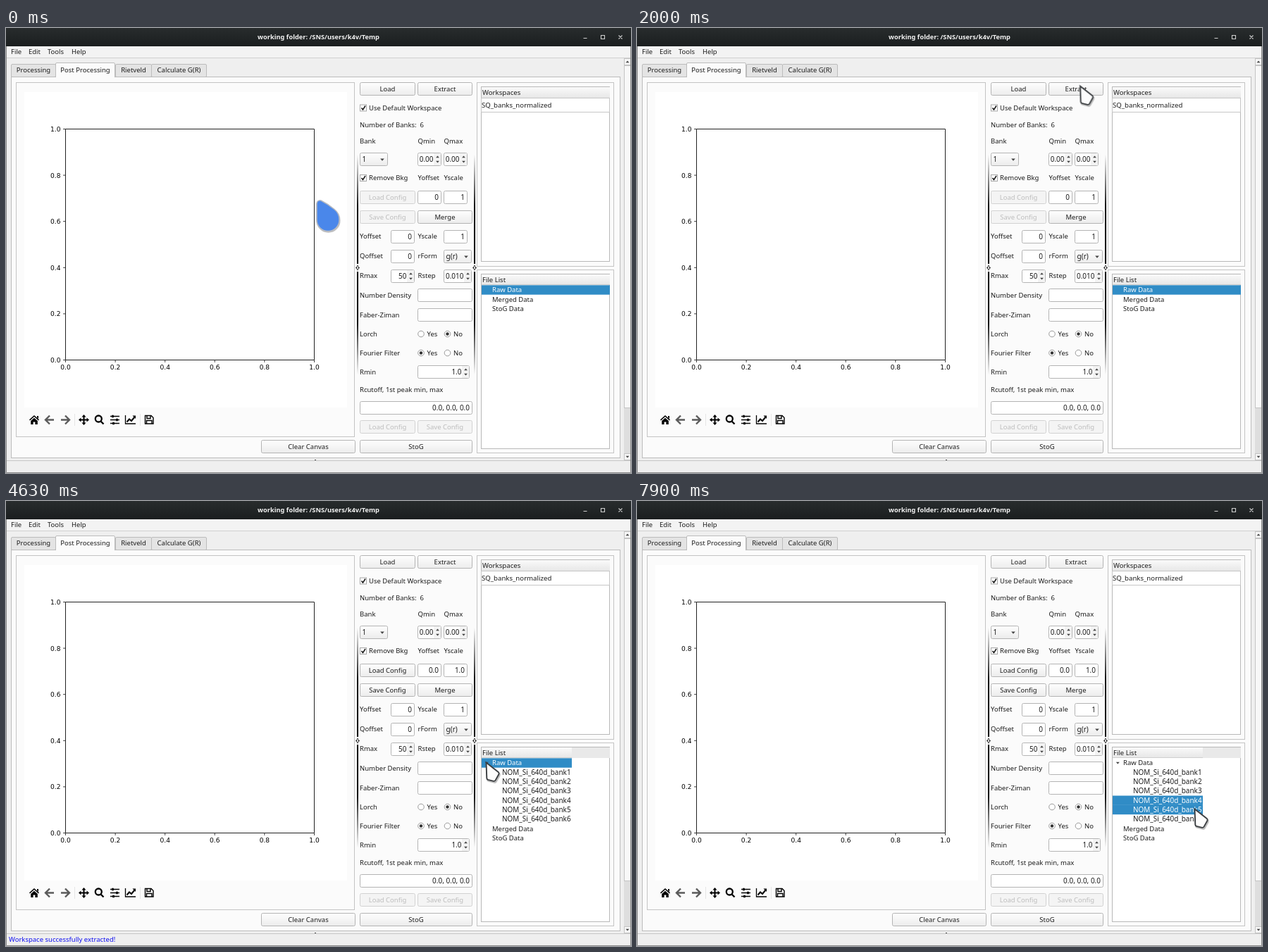
Animation of 887x632 px, one loop 8000 ms. Source, as an HTML page:

```html
<!DOCTYPE html>
<html lang="en">
<head>
<meta charset="utf-8">
<title>Post Processing</title>
<style>
html, body { margin: 0; width: 100%; height: 100%; overflow: hidden; background: #efefef; }
svg { display: block; width: 887px; height: 632px; }
text { font: 9.5px "Noto Sans", sans-serif; fill: #1c1c1c; white-space: pre; }
.tick { font: 9.1px "DejaVu Sans", sans-serif; fill: #000; }
.title { font-weight: 700; font-size: 9.25px; fill: #f2f2f2; }
.num { font-size: 10px; }
.bank { font-size: 9.95px; }
.item { font-size: 9.65px; }
.off { fill: #bdbdbd; }
.sel { fill: #fff; }
.status { fill: #1010f0; }
</style>
</head>
<body>
<svg id="stage" viewBox="0 0 887 632">
  <defs>
    <linearGradient id="face" x2="0" y2="1"><stop stop-color="#fefefe"/><stop offset="1" stop-color="#ececec"/></linearGradient>
    <linearGradient id="head" x2="0" y2="1"><stop stop-color="#fafafa"/><stop offset="1" stop-color="#e6e6e6"/></linearGradient>
    <linearGradient id="bar" x2="0" y2="1"><stop stop-color="#282c2d"/><stop offset="1" stop-color="#1b1e1f"/></linearGradient>
    <linearGradient id="grip" x2="0" y2="1">
      <stop stop-color="#000" stop-opacity="0"/><stop offset=".25"/><stop offset=".75"/><stop offset="1" stop-color="#000" stop-opacity="0"/>
    </linearGradient>
  </defs>
</svg>
<script>
const LOOP = 8000;
const rules = new Map();
const pct = ms => +(ms / LOOP * 100).toFixed(4) + '%';

// Content visible only between two times of the loop.
function during(from, to, content) {
  const name = `show-${from}-${to}`;
  rules.set(name, `0%{visibility:hidden}${pct(from)}{visibility:visible}${pct(to)}{visibility:hidden}`);
  return `<g style="animation:${name} ${LOOP}ms step-end infinite">${content}</g>`;
}

function moving(stops, content) {
  rules.set('pointer', stops.map(([ms, x, y]) => `${pct(ms)}{transform:translate(${x}px,${y}px)}`).join(''));
  return `<g style="animation:pointer ${LOOP}ms linear infinite">${content}</g>`;
}

const fillRect = (x, y, w, h, fill) => `<rect x="${x}" y="${y}" width="${w}" height="${h}" fill="${fill}"/>`;
const box = (x, y, w, h, fill = '#fff', stroke = '#b9b9b9', r = 0) =>
  `<rect x="${x + .5}" y="${y + .5}" width="${w - 1}" height="${h - 1}" rx="${r}" fill="${fill}" stroke="${stroke}"/>`;
const path = (d, stroke = '#000', width = 1, fill = 'none') =>
  `<path d="${d}" stroke="${stroke}" stroke-width="${width}" fill="${fill}"/>`;
const solid = (d, fill = '#000') => `<path d="${d}" fill="${fill}"/>`;
// y is the middle of the line of text
const text = (x, y, s, cls = '', anchor = 'start') =>
  `<text x="${x}" y="${y + 3.4}" class="${cls}" text-anchor="${anchor}">${s}</text>`;

const down = (x, y, s = 2.4) => solid(`M${x - s} ${y - s / 2}h${2 * s}l${-s} ${s * 1.1}z`, '#444');
const up = (x, y, s = 2.4) => solid(`M${x - s} ${y + s / 2}h${2 * s}l${-s} ${-s * 1.1}z`, '#444');

const button = (x, y, w, label, on = true) =>
  box(x, y, w, 19, on ? 'url(#face)' : '#f4f4f4', on ? '#b4b4b4' : '#d2d2d2', 2) +
  text(x + w / 2, y + 9.5, label, on ? '' : 'off', 'middle');
const field = (x, y, w, value = '') =>
  box(x, y, w, 19, '#fff', '#b4b4b4', 2) + text(x + w - 4, y + 9.5, value, 'num', 'end');
const spin = (x, y, w, value) =>
  box(x, y, w, 19, '#fff', '#b4b4b4', 2) + fillRect(x + w - 11, y + 1, 10, 17, '#f3f3f3') +
  text(x + w - 11.5, y + 9.5, value, 'num', 'end') + up(x + w - 5.5, y + 6) + down(x + w - 5.5, y + 13);
const combo = (x, y, w, value) =>
  box(x, y, w, 19, 'url(#face)', '#b4b4b4', 2) + text(x + 3.5, y + 9.5, value, 'num') + down(x + w - 8, y + 10, 2.8);
const check = (y, label) =>
  box(502, y - 5, 10, 10, '#fff', '#a8a8a8') + path(`M504.5 ${y}l2 2.5 3.5-5.5`, '#111', 1.5) + text(515, y, label);
const radio = (x, y, label, on) =>
  `<circle cx="${x}" cy="${y}" r="4.3" fill="#fff" stroke="#999"/>` +
  (on ? `<circle cx="${x}" cy="${y}" r="2.2" fill="#333"/>` : '') + text(x + 8.5, y, label);

function frame() {
  const tab = (x, w, label, active) =>
    box(x, active ? 49 : 51, w, active ? 22 : 19, active ? '#fbfbfb' : '#e4e4e4', '#bcbcbc', 1.5) +
    (active ? fillRect(x + 1, 69, w - 2, 3, '#fbfbfb') : '') + text(x + w / 2, active ? 59.5 : 60, label, '', 'middle');
  return fillRect(0, 0, 887, 632, '#efefef') + fillRect(0, 0, 887, 26, 'url(#bar)') +
    text(443.5, 13, 'working folder: /SNS/users/k4v/Temp', 'title', 'middle') +
    path('M819.5 14.5h5M844.5 10.5h5v5h-5zM869.5 10.5l5 5m0-5l-5 5', '#cfcfcf', 1.1) +
    fillRect(0, 26, 887, 16, '#f3f3f3') + path('M0 42.5H887', '#d0d0d0') +
    [[7, 'File'], [32, 'Edit'], [59, 'Tools'], [93, 'Help']].map(([x, s]) => text(x, 33.5, s)).join('') +
    tab(7, 64, 'Processing') + tab(155, 52, 'Rietveld') + tab(206, 79, 'Calculate G(R)') +
    box(7, 69, 865, 542, '#fbfbfb', '#bcbcbc') + tab(70, 85, 'Post Processing', true) +
    fillRect(877, 43, 10, 571, '#dedede') + box(877, 43, 10, 10, '#f6f6f6', '#c4c4c4') + up(882, 48) +
    box(877, 53, 10, 487, '#f8f8f8', '#c4c4c4') + box(877, 604, 10, 10, '#f6f6f6', '#c4c4c4') + down(882, 609) +
    path('M0 614.5H887', '#c6c6c6') + fillRect(438, 613, 2, 1, '#444') +
    path('M.5 26V631.5H886.5V26', '#8a8a8a');
}

function plot() {
  let s = box(14, 77, 481, 504, '#fbfbfb', '#c4c4c4') + fillRect(26, 91, 458, 448, '#fff') +
    path('M84.5 143.5H437.5V471.5H84.5Z', '#222', 1);
  for (let i = 0; i <= 5; i++) {
    const x = 84.5 + 70.6 * i, y = 471.5 - 65.6 * i, label = (i / 5).toFixed(1);
    s += path(`M${x} 471.5v3.4M84.5 ${y}h-3.4`, '#222', .9) +
      text(x, 481.5, label, 'tick', 'middle') + text(77.5, y, label, 'tick', 'end');
  }
  return s + tools() + button(362, 585, 134, 'Clear Canvas');
}

function tools() {
  const arrow = (x, dir) => path(`M${x - 6 * dir} 556.5h11M${x} 550.5l${6 * dir} 6 ${-6 * dir} 6`.replace('h11', `h${11 * dir}`), '#5b5b5b', 2.4);
  return solid('M40 550l7 6.3-1 1.2-6-5.4-6 5.4-1-1.2zM44 551h2v4l-2-2zM35.2 558l4.8-4.2 4.8 4.2v5h-3.4v-3.6h-2.8v3.6h-3.4z') +
    arrow(62, -1) + arrow(84, 1) + path('M97.5 548v17M190.5 548v17', '#e6e6e6') +
    path('M110.5 551v11M105 556.5h11', '#000', 2) +
    solid('M110.5 549l3 3.4h-6zM110.5 564l3-3.4h-6zM103 556.5l3.4-3v6zM118 556.5l-3.4-3v6z') +
    path('M135.8 555a4.5 4.5 0 1 1-9 0a4.5 4.5 0 1 1 9 0M134.5 558.5l4 4', '#000', 2.3) +
    path('M148 551.5h13M148 556.5h13M148 561.5h13', '#000', 1.4) +
    path('M151.5 549.7v3.6M157.5 554.7v3.6M152.5 559.7v3.6', '#000', 2.6) +
    path('M169.5 550v12H184', '#000', 1.3) + path('M171.5 559.5l3.5-4 3 2.5 4.5-5.5', '#000', 2) + solid('M179.5 550.5h4.5v4.5z') +
    path('M197.5 550.5h8.5l3 3v8.5h-11.5zM200 551v3.5h5v-3.5M199.5 562v-4.5h7.5v4.5', '#000', 1.4);
}

function controls() {
  const grip = x => fillRect(x - 1, 180, 2, 312, 'url(#grip)') + fillRect(x - 2, 335, 4, 11, '#fbfbfb') +
    solid(`M${x - 3} 340.5l2.2-2v4zM${x + 3} 340.5l-2.2-2v4zM${x} 336.5l1.5 2h-3zM${x} 344.5l1.5-2h-3z`, '#222');
  const labels = [
    [502, 138, 'Number of Banks:  6'], [502, 160.5, 'Bank'], [584.5, 160.5, 'Qmin'], [621.5, 160.5, 'Qmax'],
    [584.5, 213, 'Yoffset'], [621.5, 213, 'Yscale'], [502, 296, 'Yoffset'], [584.5, 296, 'Yscale'],
    [502, 324, 'Qoffset'], [584.5, 324, 'rForm'], [502, 352, 'Rmax'], [584.5, 352, 'Rstep'],
    [502, 379.5, 'Number Density'], [502, 407.5, 'Faber-Ziman'], [502, 434.5, 'Lorch'],
    [502, 461.5, 'Fourier Filter'], [502, 488.5, 'Rmin'], [502, 513.5, 'Rcutoff, 1st peak min, max']
  ];
  const background = on => button(502, 231, 79, 'Load Config', on) + button(502, 259, 79, 'Save Config', on) +
    field(584, 231, 34, on ? '0.0' : '0') + field(621, 231, 34, on ? '1.0' : '1');
  return grip(499) + grip(665) + labels.map(l => text(...l)).join('') +
    button(502, 77, 79, 'Load') + button(584, 77, 78, 'Extract') +
    during(2330, 2600, box(584, 77, 78, 19, '#dcdcdc', '#a2a2a2', 2) + text(623, 86.5, 'Extract', '', 'middle')) +
    check(113.5, 'Use Default Workspace') + combo(502, 177, 40, '1') + spin(584, 177, 34, '0.00') + spin(621, 177, 34, '0.00') +
    check(213, 'Remove Bkg') + during(0, 2800, background(false)) + during(2800, LOOP, background(true)) +
    button(584, 259, 78, 'Merge') + field(546, 287, 34, '0') + field(621, 287, 34, '1') +
    field(546, 315, 34, '0') + combo(621, 315, 40, 'g(r)') + spin(546, 343, 34, '50') + spin(621, 343, 40, '0.010') +
    field(584, 370, 78) + field(584, 398, 78) +
    radio(589, 434.5, 'Yes') + radio(626.5, 434.5, 'No', true) + radio(589, 461.5, 'Yes', true) + radio(626.5, 461.5, 'No') +
    spin(584, 479, 74, '1.0') + field(502, 530, 160, '0.0, 0.0, 0.0') +
    button(502, 557, 79, 'Load Config', false) + button(584, 557, 78, 'Save Config', false) + button(502, 585, 160, 'StoG');
}

function lists() {
  const rowY = i => 372 + 13.3 * i;
  const row = (i, x, label, width, cls = '') =>
    (width ? fillRect(675, rowY(i) - 6.7, width, 13.4, '#308cc6') : '') + text(x, rowY(i), label, `${cls} ${width ? 'sel' : ''}`);
  const raw = width => row(0, 690, 'Raw Data', width);
  const tail = i => row(i, 690, 'Merged Data') + row(i + 1, 690, 'StoG Data');
  const bank = (n, width) => row(n, 704, 'NOM_Si_640d_bank' + n, width, 'bank');
  const header = w => fillRect(675, 350, 182, 15, '#e9e9e9') + fillRect(675, 350, w, 15, 'url(#head)') +
    path(`M675 364.5h${w}`, '#cfcfcf') + text(676, 357.5, 'File List');
  const banks = [1, 2, 3, 4, 5, 6].map(n => bank(n)).join('');
  return box(668, 77, 195, 262, '#fbfbfb', '#c4c4c4') + box(674, 83, 183, 249, '#fff', '#b9b9b9') +
    fillRect(675, 84, 182, 16, 'url(#head)') + box(674, 99, 183, 21, '#fff', '#c6c6c6') +
    text(676, 92, 'Workspaces', 'item') + text(675, 110, 'SQ_banks_normalized', 'item') +
    box(668, 343, 195, 261, '#fbfbfb', '#c4c4c4') + box(674, 349, 183, 249, '#fff', '#b9b9b9') +
    during(0, 2800, header(182) + raw(182) + tail(1)) +
    during(2800, 4630, header(74) + raw(74) + tail(1) + solid('M681 369.5l2.8 2.5-2.8 2.5z', '#222')) +
    during(4630, LOOP, header(128) + banks + tail(7)) +
    during(4630, 6630, raw(128)) + during(6630, LOOP, raw(0) + bank(4, 128)) +
    during(7530, LOOP, bank(5, 128)) + during(4630, LOOP, down(682.3, 372, 2.5)) +
    during(2800, 7530, text(4, 623, 'Workspace successfully extracted!', 'status'));
}

function pointer() {
  const drop = 'M1 5Q2 0 7 1Q17 6 26 13.5Q33 19 33 28A16 16 0 0 1 17 44.5A16 16 0 0 1 1 28Z';
  const arrow = 'M.5 .5L18 14.3Q19.2 15.6 18.3 17.2L13.6 25.6Q12.7 27.2 11 26.8L3 24.8Q1.4 24.3 1.3 22.6Z';
  const stops = [
    [0, 440, 244], [230, 440, 244], [300, 424, 236], [380, 412, 216], [480, 470, 160], [600, 592, 100],
    [700, 627, 84], [780, 638, 83], [900, 612, 84], [1030, 590, 86], [1060, 590, 86], [1230, 660, 98],
    [1400, 715, 109], [1560, 713, 110], [1680, 660, 96], [1820, 598, 84], [2000, 628.5, 82], [2130, 627, 84],
    [3530, 627, 84], [3700, 690, 230], [3880, 763, 400], [4020, 722, 442], [4230, 681, 371],
    [4900, 681, 371], [5150, 704, 425], [5350, 735, 447], [5550, 772, 436], [5700, 786, 416],
    [5730, 786, 416], [5860, 789, 427], [6130, 789, 427], [6400, 788, 412], [6630, 788, 412],
    [7000, 790, 430], [7330, 791, 437], [LOOP, 791, 437]
  ];
  const blue = `<g opacity=".25" transform="translate(.5 1.2)">${path(drop, '#000', 2)}</g>` + path(drop, '#b4b9c2', 1.4, '#4a87ea');
  const white = `<g opacity=".25" transform="translate(1 1.8)">${path(arrow, '#000', 2.6)}</g>` + path(arrow, '#3c3f42', 1.9, '#fdfdfd');
  return moving(stops, during(0, 330, blue) + during(330, LOOP, white));
}

document.getElementById('stage').insertAdjacentHTML('beforeend', frame() + plot() + controls() + lists() + pointer());
const sheet = document.createElement('style');
sheet.textContent = [...rules].map(([name, body]) => `@keyframes ${name}{${body}}`).join('\n');
document.head.append(sheet);
</script>
</body>
</html>
```
